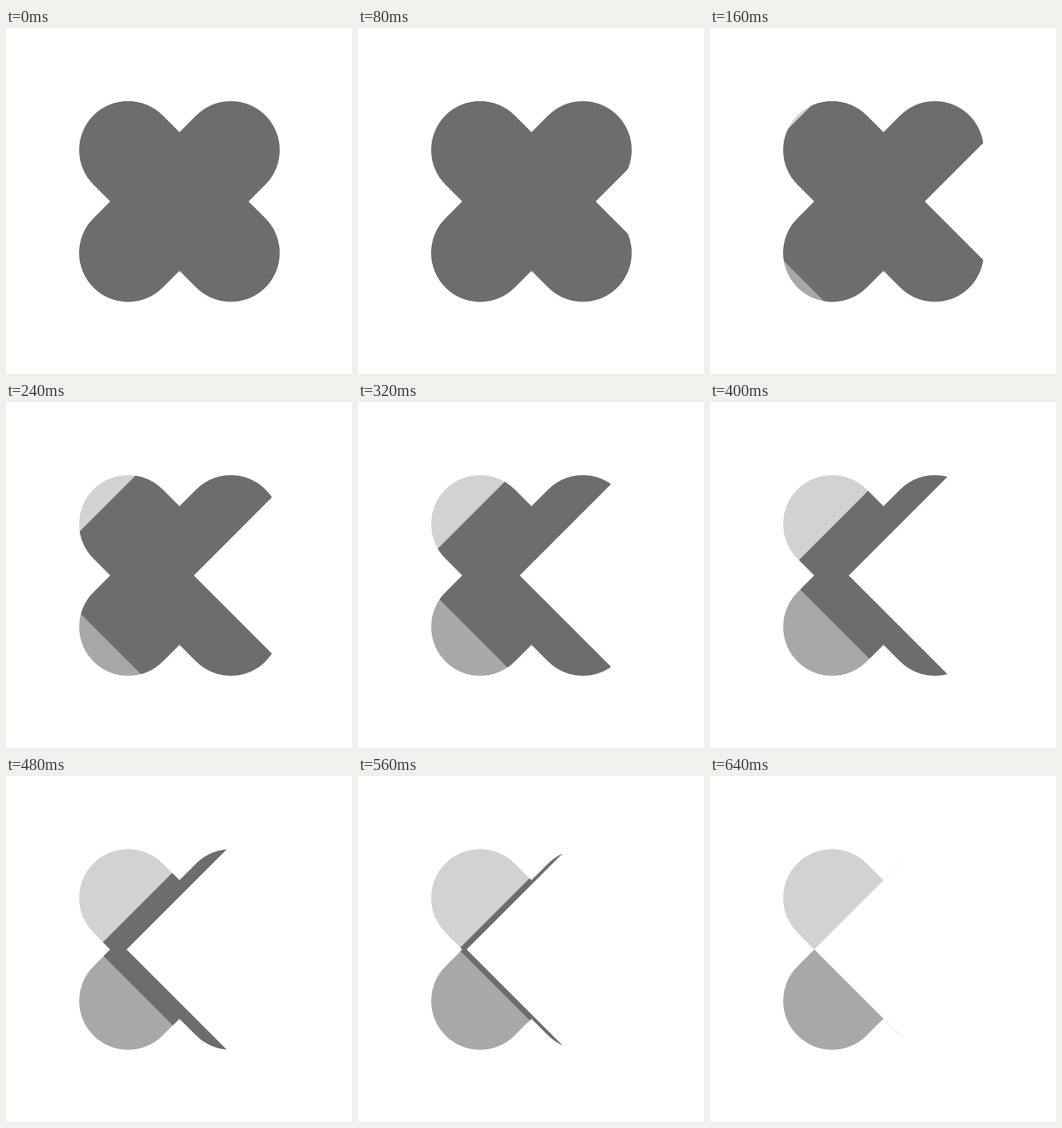
Animation, 375 px wide and 375 px high, one loop 1 s. Source, as an HTML page:

```html
<!DOCTYPE html>
<html lang="en">
<head>
<meta charset="utf-8">
<title>Folding cross</title>
<style>
  html, body { margin: 0; width: 100%; height: 100%; overflow: hidden; background: #fff; }
  svg { display: block; width: 100%; height: 100%; }
  .cross { fill: none; stroke-width: 106; stroke-linecap: round; }
</style>
</head>
<body>
<svg viewBox="0 0 375 375">
  <defs>
    <path id="cross" d="M132.3 132.3 243.7 243.7M132.3 243.7 243.7 132.3"/>
    <clipPath id="topLobe"><polygon points="0,0 301,0 113,188 0,188"/></clipPath>
    <clipPath id="bottomLobe"><polygon points="0,376 301,376 113,188 0,188"/></clipPath>
    <clipPath id="cover"><polygon id="topBand"/><polygon id="bottomBand"/></clipPath>
  </defs>
  <g class="cross">
    <g clip-path="url(#topLobe)"><use href="#cross" stroke="#d2d2d2"/></g>
    <g clip-path="url(#bottomLobe)"><use href="#cross" stroke="#a8a8a8"/></g>
    <g clip-path="url(#cover)"><use href="#cross" stroke="#6d6d6d"/></g>
  </g>
</svg>
<script>
  const LOOP = 1000, STEP = 40, START = 40, DURATION = 600;
  const MIDDLE = 188, FOLD = 301;
  const topBand = document.getElementById('topBand');
  const bottomBand = document.getElementById('bottomBand');

  const bezier = (a, b, s) => 3 * (1 - s) ** 2 * s * a + 3 * (1 - s) * s * s * b + s ** 3;

  // Cubic-bezier easing, solved for its parameter by bisection.
  function ease(u) {
    if (u <= 0 || u >= 1) return u <= 0 ? 0 : 1;
    let low = 0, high = 1;
    for (let i = 0; i < 24; i++) {
      const mid = (low + high) / 2;
      if (bezier(0.167, 0.58, mid) < u) low = mid; else high = mid;
    }
    return bezier(0, 1, low);
  }

  // Diagonal band between two 45° edges; outerY is the far side of its half.
  function setBand(band, left, right, outerY) {
    band.setAttribute('points',
      `${left - MIDDLE},${MIDDLE} ${right - MIDDLE},${MIDDLE} ${right},${outerY} ${left},${outerY}`);
  }

  function draw(now) {
    const time = Math.floor((now % LOOP) / STEP) * STEP;
    const rest = 1 - ease((time - START) / DURATION);
    // At rest the cover reaches past both ends of the cross.
    const right = rest === 1 ? 600 : FOLD + 150 * rest;
    setBand(topBand, FOLD - 134 * rest, right, 0);
    setBand(bottomBand, FOLD - 122 * rest, right, 2 * MIDDLE);
  }

  const origin = performance.now();
  function tick() {
    draw(performance.now() - origin);
    requestAnimationFrame(tick);
  }
  tick();
</script>
</body>
</html>
```
